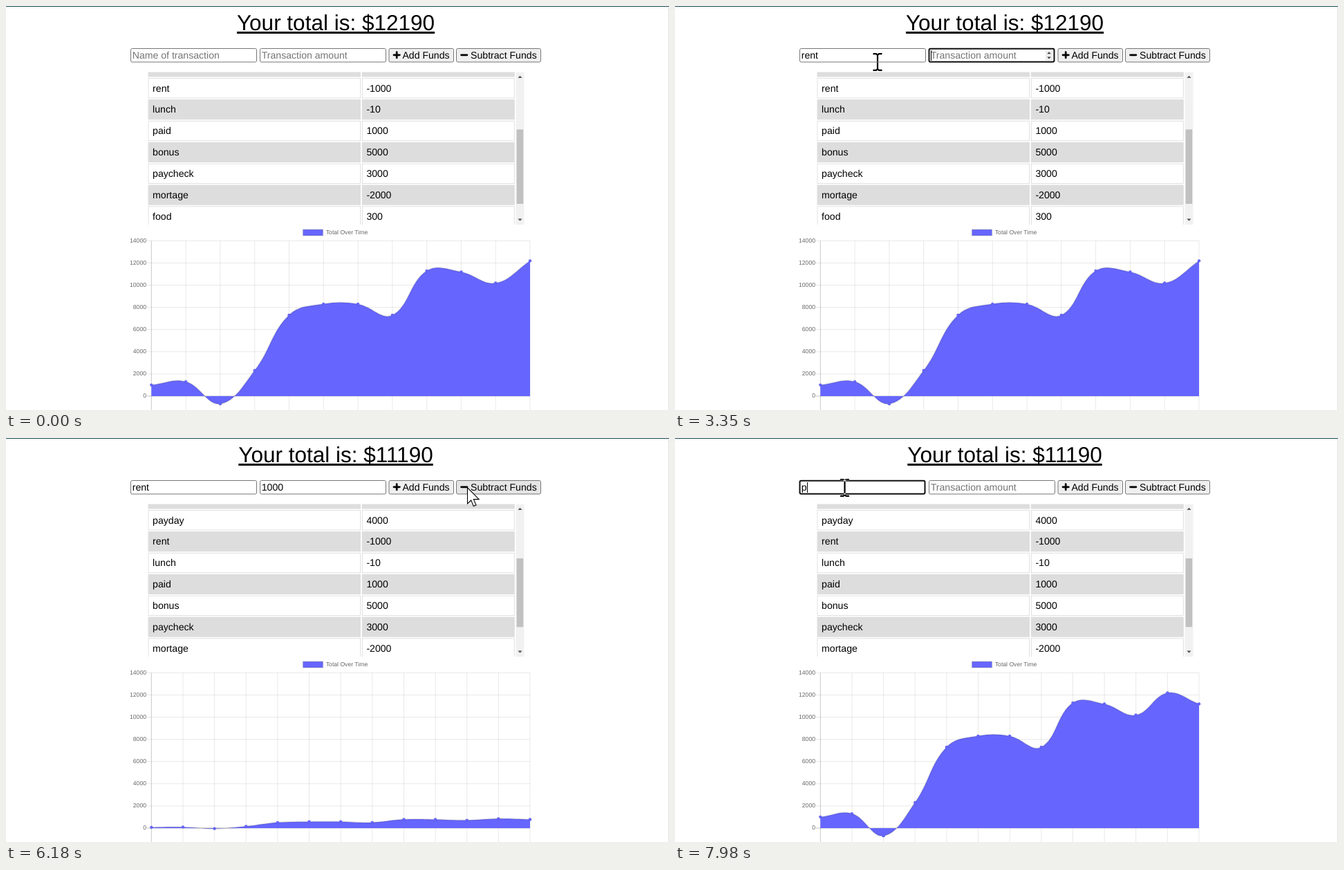
Animation of 959 by 584 pixels, one loop 8 s. Source, as an HTML page with a canvas:

```html
<!DOCTYPE html>
<html lang="en">
<head>
<meta charset="utf-8">
<title>Budget tracker</title>
<style>
  html, body { margin: 0; width: 100%; height: 100%; overflow: hidden; background: #fff; }
  canvas { position: absolute; left: 0; top: 0; }
  h1 {
    position: absolute; left: 177px; top: 6px; width: 600px; margin: 0;
    font: 400 31.5px/36px "Liberation Sans", Arial, sans-serif;
    text-align: center; text-decoration: underline; white-space: nowrap;
    text-rendering: geometricPrecision; color: #000;
  }
</style>
</head>
<body>
<canvas id="stage" width="959" height="584"></canvas>
<h1 id="total"></h1>
<script>
const LOOP = 8000;
const ctx = document.getElementById('stage').getContext('2d');
const title = document.getElementById('total');
const FONT = '"Liberation Sans", Arial, sans-serif';
const BLUE = '#6666ff', FAINT = 'rgba(0,0,0,0.1)';

const SUBMIT = 6170, CLEAR = 6250;
const FOCUS = [[0, ''], [1630, 'name'], [3350, 'amount'], [6050, ''], [7160, 'name']];
const NAME_KEYS = [2490, 2620, 2880, 3080];
const AMOUNT_KEYS = [4170, 4370, 4570, 4770];
const NEXT_KEYS = [7980];
const CARET_RESETS = [...FOCUS.map(f => f[0]), ...NAME_KEYS, ...AMOUNT_KEYS, ...NEXT_KEYS];

// newest first
const ROWS = [
  ['payday', 4000], ['rent', -1000], ['lunch', -10], ['paid', 1000],
  ['bonus', 5000], ['paycheck', 3000], ['mortage', -2000], ['food', 300]
];
const TOTALS = [1000, 1300, -700, 2300, 7300, 8300, 8290, 7290, 11290, 11190, 10190, 12190, 11190];

// time, x, y of the pointer
const POINTER = [
  [190, 846, 548], [400, 600, 260], [560, 300, 88], [700, 137, 150], [880, 342, 217],
  [960, 342, 215], [1020, 340, 208], [1400, 310, 110], [1600, 294, 81], [1760, 293, 81],
  [5450, 293, 81], [5850, 667, 71], [6190, 667, 71], [6460, 308, 39],
  [6860, 262, 50], [7100, 245.5, 72], [8000, 245.5, 72]
];

const FIELDS = {
  name: { x: 180, hint: 'Name of transaction' },
  amount: { x: 367, hint: 'Transaction amount' }
};
const BUTTONS = [
  { x: 554, w: 93.5, label: 'Add Funds', plus: true },
  { x: 651.5, w: 122, label: 'Subtract Funds', plus: false }
];
const BAR_TOP = 61.5, BAR_H = 19.5, FIELD_W = 182;

const typed = (text, keys, t) => text.slice(0, keys.filter(k => t >= k).length);
const within = (p, x, w) => p && p.x >= x && p.x <= x + w && p.y >= 61 && p.y <= 82;

function text(str, x, y, { size = 14.1, color = '#000', align = 'left', base = 'alphabetic' } = {}) {
  ctx.font = `${size}px ${FONT}`;
  ctx.textRendering = 'geometricPrecision';
  ctx.fillStyle = color;
  ctx.textAlign = align;
  ctx.textBaseline = base;
  ctx.fillText(str, x, y);
}

function rect(x, y, w, h, color) {
  ctx.fillStyle = color;
  ctx.fillRect(x, y, w, h);
}

function line(x1, y1, x2, y2, color, width) {
  ctx.strokeStyle = color;
  ctx.lineWidth = width;
  ctx.beginPath();
  ctx.moveTo(x1, y1);
  ctx.lineTo(x2, y2);
  ctx.stroke();
}

function box(x, y, w, h, fill, stroke, width) {
  ctx.beginPath();
  ctx.roundRect(x, y, w, h, 2);
  ctx.fillStyle = fill;
  ctx.fill();
  ctx.strokeStyle = stroke;
  ctx.lineWidth = width;
  ctx.stroke();
}

function triangle(x, y, half, height, color) {
  ctx.fillStyle = color;
  ctx.beginPath();
  ctx.moveTo(x - half, y + height / 2);
  ctx.lineTo(x + half, y + height / 2);
  ctx.lineTo(x, y - height / 2);
  ctx.fill();
}

function pointerAt(t) {
  if (t < POINTER[0][0]) return null;
  const i = Math.max(1, POINTER.findIndex(k => k[0] > t));
  const [t0, x0, y0] = POINTER[i - 1], [t1, x1, y1] = POINTER[i];
  const p = (t - t0) / (t1 - t0), e = p * p * (3 - 2 * p);
  return { x: x0 + (x1 - x0) * e, y: y0 + (y1 - y0) * e };
}

function drawField(id, value, focused, caretOn) {
  const { x, hint } = FIELDS[id];
  const size = { color: value ? '#000' : '#757575' };
  if (focused) box(x + 0.5, BAR_TOP + 0.3, FIELD_W - 1, BAR_H - 0.6, '#fff', '#101010', 2);
  else box(x + 0.5, BAR_TOP, FIELD_W, BAR_H, '#fff', '#767676', 1);
  text(value || hint, x + 2.7, 76, size);
  if (focused && id === 'amount') {
    rect(535.5, 63.5, 11, 15.5, '#efefef');
    triangle(541, 67.8, 2.8, 3, '#404040');
    triangle(541, 75, 2.8, -3, '#404040');
  }
  if (focused && caretOn) {
    const w = value ? ctx.measureText(value).width : 0;
    rect(Math.round(x + 2.7 + w), 64, 1, 15, '#000');
  }
}

function drawButton({ x, w, label, plus }, hover) {
  box(x, BAR_TOP, w, BAR_H, hover ? '#e5e5e5' : '#efefef', '#767676', 1);
  const cx = x + 11.2, cy = 70.8;
  ctx.lineCap = 'round';
  line(cx - 4.2, cy, cx + 4.2, cy, '#000', 2.7);
  if (plus) line(cx, cy - 4.2, cx, cy + 4.2, '#000', 2.7);
  ctx.lineCap = 'butt';
  text(label, x + (plus ? 19.4 : 20.6), 76);
}

function drawTable(done) {
  const rows = done ? ROWS : ROWS.slice(1);
  const cells = [[205.5, 307.5], [514.8, 221]];
  ctx.save();
  ctx.beginPath();
  ctx.rect(200, 95.5, 560, 220.5);
  ctx.clip();
  for (let i = -1; i < 7; i++) {
    const y = 104.2 + i * 30.87;
    cells.forEach(([x, w], col) => {
      if (i % 2) {
        rect(x, y, w, 29.2, '#ddd');
      } else {
        ctx.strokeStyle = '#ddd';
        ctx.lineWidth = 0.9;
        ctx.strokeRect(x + 0.5, y + 0.4, w - 1, 28.4);
      }
      if (i >= 0) text(String(rows[i][col]), x + 6.6, y + 19.4);
    });
  }
  rect(737.5, 95.5, 12, 220.5, '#f1f1f1');
  if (done) rect(738.6, 174, 9.6, 99.2, '#c1c1c1');
  else rect(738.6, 178.5, 9.6, 107.5, '#c1c1c1');
  triangle(743.5, 102.3, 3, 3.2, '#505050');
  triangle(743.5, 309.2, 3, -3.2, '#505050');
  ctx.restore();
}

// smooth curve whose handles follow the neighbours' direction
function handles(prev, cur, next) {
  const a = Math.hypot(cur.x - prev.x, cur.y - prev.y);
  const b = Math.hypot(next.x - cur.x, next.y - cur.y);
  const ka = 0.4 * a / (a + b), kb = 0.4 * b / (a + b);
  const dx = next.x - prev.x, dy = next.y - prev.y;
  return {
    before: { x: cur.x - ka * dx, y: cur.y - ka * dy },
    after: { x: cur.x + kb * dx, y: cur.y + kb * dy }
  };
}

function traceCurve(pts) {
  const h = pts.map((p, i) => handles(pts[i - 1] || p, p, pts[i + 1] || p));
  for (let i = 1; i < pts.length; i++) {
    const a = h[i - 1].after, b = h[i].before;
    ctx.bezierCurveTo(a.x, a.y, b.x, b.y, pts[i].x, pts[i].y);
  }
}

function drawChart(t, done) {
  const left = 210.3, right = 758, top = 339.4, zero = 563.9;
  const yOf = v => zero - v * (zero - top) / 14000;
  const data = done ? TOTALS : TOTALS.slice(0, -1);
  const step = (right - left) / (data.length - 1);
  const p = done ? Math.min(1, (t - 6161) / 1124) : 1;
  const grow = 1 - (1 - p) ** 4;

  ctx.fillStyle = BLUE;
  ctx.fillRect(429.6, 323.2, 28.8, 8.65);
  ctx.strokeStyle = FAINT;
  ctx.lineWidth = 2.16;
  ctx.strokeRect(429.6, 323.2, 28.8, 8.65);
  text('Total Over Time', 462.8, 327.4, { size: 8.65, color: '#666', base: 'middle' });

  for (let v = 0; v <= 14000; v += 2000) {
    const y = yOf(v);
    line(203.6, y, right, y, v ? FAINT : 'rgba(0,0,0,0.25)', 0.9);
    text(String(v), 203, y - 0.2, { size: 8.65, color: '#666', align: 'right', base: 'middle' });
  }
  data.forEach((_, i) => {
    const x = left + i * step;
    line(x, top, x, 584, i ? FAINT : 'rgba(0,0,0,0.25)', 0.9);
  });

  const pts = data.map((v, i) => ({ x: left + i * step, y: yOf(v * grow) }));
  ctx.beginPath();
  ctx.moveTo(left, zero);
  ctx.lineTo(pts[0].x, pts[0].y);
  traceCurve(pts);
  ctx.lineTo(right, zero);
  ctx.closePath();
  ctx.fillStyle = BLUE;
  ctx.fill();

  ctx.beginPath();
  ctx.moveTo(pts[0].x, pts[0].y);
  traceCurve(pts);
  ctx.strokeStyle = FAINT;
  ctx.lineWidth = 2.16;
  ctx.stroke();

  ctx.lineWidth = 0.72;
  for (const { x, y } of pts) {
    ctx.beginPath();
    ctx.arc(x, y, 2.16, 0, Math.PI * 2);
    ctx.fillStyle = BLUE;
    ctx.fill();
    ctx.stroke();
  }
}

function drawArrow() {
  ctx.beginPath();
  ctx.moveTo(0.5, 0.8);
  ctx.lineTo(0.5, 24);
  ctx.lineTo(5.7, 19);
  ctx.lineTo(9.3, 27.6);
  ctx.lineTo(13, 26);
  ctx.lineTo(9.4, 17.6);
  ctx.lineTo(17.2, 17.6);
  ctx.closePath();
  ctx.fillStyle = '#fff';
  ctx.fill();
  ctx.strokeStyle = '#000';
  ctx.lineWidth = 1.1;
  ctx.stroke();
}

// inverts whatever lies below it
function drawBeam() {
  ctx.globalCompositeOperation = 'difference';
  ctx.strokeStyle = '#fff';
  ctx.lineWidth = 2.2;
  ctx.beginPath();
  for (const s of [-1, 1]) {
    ctx.moveTo(-6.5, 11.8 * s);
    ctx.lineTo(-2, 11.8 * s);
    ctx.lineTo(0, 10.2 * s);
    ctx.lineTo(2, 11.8 * s);
    ctx.lineTo(6.5, 11.8 * s);
  }
  ctx.moveTo(0, -10.2);
  ctx.lineTo(0, 10.2);
  ctx.stroke();
}

function drawPointer(p) {
  if (!p) return;
  const overField = Object.values(FIELDS).some(f => within(p, f.x, FIELD_W));
  ctx.save();
  ctx.translate(p.x, p.y);
  if (overField) drawBeam();
  else drawArrow();
  ctx.restore();
}

function render(t) {
  const done = t >= SUBMIT, cleared = t >= CLEAR;
  const focus = FOCUS.filter(f => t >= f[0]).pop()[1];
  const lastReset = Math.max(...CARET_RESETS.filter(k => t >= k));
  const caretOn = (t - lastReset) % 1060 < 530;
  const pointer = pointerAt(t);
  const name = cleared ? typed('p', NEXT_KEYS, t) : typed('rent', NAME_KEYS, t);
  const amount = cleared ? '' : typed('1000', AMOUNT_KEYS, t);

  const heading = `Your total is: $${done ? 11190 : 12190}`;
  if (title.textContent !== heading) title.textContent = heading;

  rect(0, 0, 959, 584, '#fff');
  rect(958, 0, 1, 584, '#e2e2e2');
  rect(0, 0, 959, 1, '#124a5a');
  drawField('name', name, focus === 'name', caretOn);
  drawField('amount', amount, focus === 'amount', caretOn);
  BUTTONS.forEach(b => drawButton(b, within(pointer, b.x, b.w)));
  drawTable(done);
  drawChart(t, done);
  drawPointer(pointer);
}

const start = performance.now();
function tick() {
  render((performance.now() - start) % LOOP);
  requestAnimationFrame(tick);
}
tick();
</script>
</body>
</html>
```
